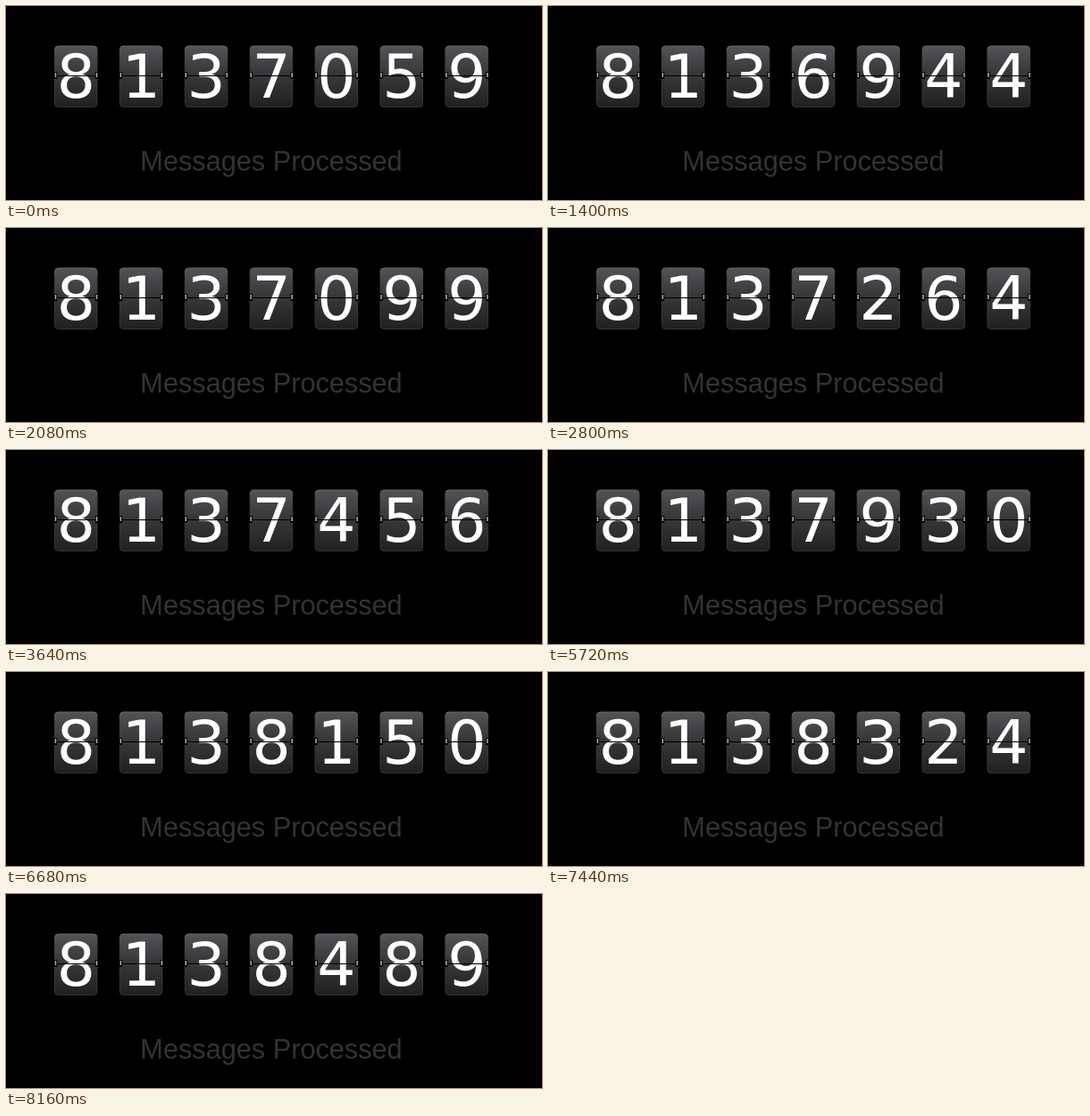
Write an HTML page that moves like this. It is 600 px wide and 218 px high and loops after 8200 ms.

```html
<!DOCTYPE html>
<html lang="en">
<head>
<meta charset="utf-8">
<title>Messages Processed</title>
<style>
html, body { margin: 0; width: 100%; height: 100%; overflow: hidden; background: #000; }
svg { display: block; width: 600px; height: 218px; }
.digit { font: 68px "DejaVu Sans", Verdana, sans-serif; fill: #fff; text-anchor: middle; }
.label { font: 30.7px "Liberation Sans", Arial, sans-serif; fill: #333334; text-anchor: middle; }
</style>
</head>
<body>
<svg id="stage" viewBox="0 0 600 218">
  <defs>
    <linearGradient id="face" x1="0" y1="0" x2="0" y2="1">
      <stop offset="0" stop-color="#545256"/>
      <stop offset=".49" stop-color="#363437"/>
      <stop offset=".5" stop-color="#383639"/>
      <stop offset="1" stop-color="#201f21"/>
    </linearGradient>
    <linearGradient id="rim" x1="0" y1="0" x2="0" y2="1">
      <stop offset="0" stop-color="#6a686c"/>
      <stop offset=".15" stop-color="#454347"/>
      <stop offset="1" stop-color="#343235"/>
    </linearGradient>
  </defs>
  <rect width="600" height="218" fill="#000"/>
  <g id="tiles"></g>
  <text class="label" x="297" y="185">Messages Processed</text>
</svg>
<script>
const LOOP = 8200, STEP = 40, RATE = 0.2286;
const RESYNC = 480, PAUSE = 320;
const FIRST = 8137059;
// Counter readings after the resync: [time, value]
const READINGS = [[1400, 8136944], [2800, 8137264], [4480, 8137648],
                  [5720, 8137930], [6680, 8138150], [8160, 8138489]];
const tiles = document.getElementById("tiles");

function add(name, attrs) {
  const el = document.createElementNS("http://www.w3.org/2000/svg", name);
  for (const key in attrs) el.setAttribute(key, attrs[key]);
  return tiles.appendChild(el);
}

function rect(x, y, width, height, fill) {
  return add("rect", { x, y, width, height, fill });
}

function hinge(x) {
  rect(x - 1.75, 74, 3.5, 8, "#000");
  rect(x - 0.75, 75, 1.5, 5, "#b4b4b6");
}

function makeTile(i) {
  const x = 54.5 + i * 72.9;
  add("rect", { x, y: 45, width: 47.5, height: 68.5, rx: 4,
                fill: "url(#face)", stroke: "url(#rim)", "stroke-width": 1 });
  const digit = add("text", { class: "digit", x: x + 23.9, y: 103 });
  rect(x - 0.5, 78, 48.5, 1, "#000");
  hinge(x + 1);
  hinge(x + 47);
  return digit;
}

const digits = Array.from({ length: 7 }, (_, i) => makeTile(i));

function valueAt(t) {
  if (t < RESYNC) return FIRST + Math.round(Math.min(t, PAUSE) * RATE);
  let i = 1;
  while (i < READINGS.length - 1 && t > READINGS[i][0]) i++;
  const [t0, v0] = READINGS[i - 1], [t1, v1] = READINGS[i];
  return Math.round(v0 + (v1 - v0) * (t - t0) / (t1 - t0));
}

function draw(ms) {
  const t = Math.floor((ms % LOOP) / STEP) * STEP;
  const text = String(valueAt(t));
  digits.forEach((digit, i) => {
    if (digit.textContent !== text[i]) digit.textContent = text[i];
  });
}

const start = performance.now();
function tick() {
  draw(performance.now() - start);
  requestAnimationFrame(tick);
}
tick();
</script>
</body>
</html>
```
